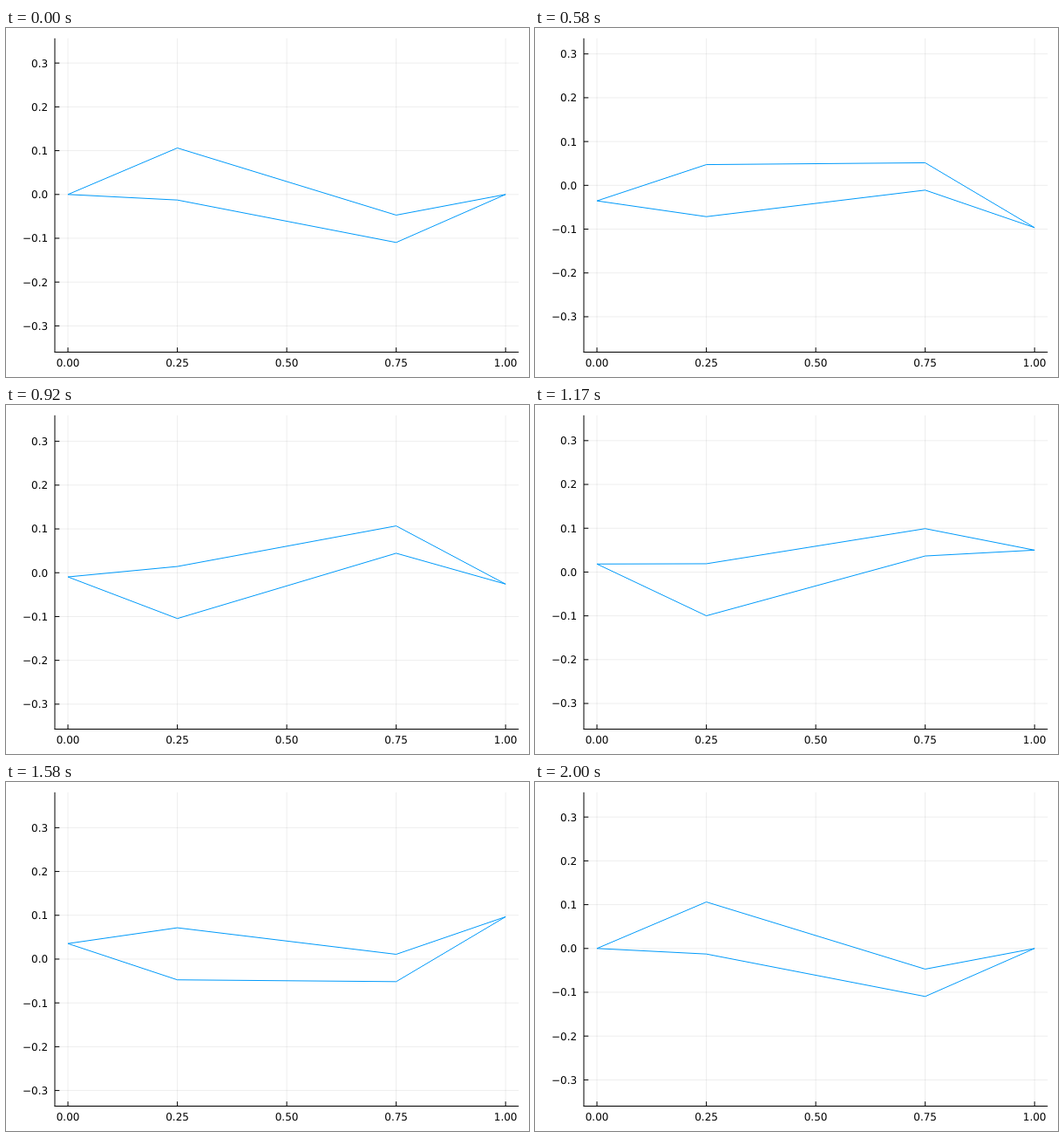
An HTML page for the animation above (2.08 s loop, 600x400 px).

```html
<!DOCTYPE html>
<html lang="en">
<head>
<meta charset="utf-8">
<title>Travelling wave</title>
<style>
  html, body { margin: 0; width: 100%; height: 100%; overflow: hidden; background: #fff; }
  svg { display: block; width: 600px; height: 400px; }
  text { font: 12px "DejaVu Sans", sans-serif; fill: #000; text-rendering: geometricPrecision; }
  path { fill: none; }
  #grid { stroke: #000; stroke-opacity: .1; stroke-width: .7; }
  #axes { stroke: #000; stroke-width: 1; }
  #body { stroke: #009afa; stroke-width: 1; stroke-linejoin: bevel; }
</style>
</head>
<body>
<svg viewBox="0 0 600 400">
  <path id="grid"/>
  <path id="axes"/>
  <g id="labels"></g>
  <path id="body"/>
</svg>
<script>
const LOOP = 2080, FPS = 12, STEPS = 24;
const TOP = 11.81, RIGHT = 588.19, BOTTOM = 371.5, TICK = 5.3;
const xTicks = [0, 0.25, 0.5, 0.75, 1];
const yTicks = [-3, -2, -1, 0, 1, 2, 3].map(n => n / 10);
const stations = [0, 0.25, 0.75, 1];

const byId = id => document.getElementById(id);
const grid = byId("grid"), axes = byId("axes"), body = byId("body");

function addLabel(text, anchor) {
  const label = document.createElementNS("http://www.w3.org/2000/svg", "text");
  label.textContent = text.replace("-", "\u2212");
  label.setAttribute("text-anchor", anchor);
  byId("labels").append(label);
  return label;
}
const xLabels = xTicks.map(v => addLabel(v.toFixed(2), "middle"));
const yLabels = yTicks.map(v => addLabel(v.toFixed(1), "end"));

function place(label, x, y) {
  label.setAttribute("x", x);
  label.setAttribute("y", y);
}

// 12% thick symmetric foil with a closed trailing edge
const thickness = x => 0.6 * (0.2969 * Math.sqrt(x) - 0.126 * x - 0.3516 * x ** 2
  + 0.2843 * x ** 3 - 0.1036 * x ** 4);
const amplitude = x => 0.0367 + 0.0323 * x + 0.031 * x * x;
const midline = (x, phase) => amplitude(x) * Math.sin(2 * Math.PI * x - phase);

function draw(step) {
  const phase = 2 * Math.PI * step / STEPS;
  const side = sign => stations.map(x => [x, midline(x, phase) + sign * thickness(x)]);
  const outline = [...side(1), ...side(-1).reverse()];
  const heights = outline.map(p => p[1]);
  const low = Math.min(...heights), high = Math.max(...heights);

  // The margin grows when steps of 0.05 give too few ticks
  const pad = 0.03 * (high - low);
  const count = Math.floor((high + pad) / 0.05) - Math.ceil((low - pad) / 0.05) + 1;
  const left = count < 4 ? 63.6 : 56;

  const unit = (RIGHT - left) / 1.06;
  const px = x => left + (x + 0.03) * unit;
  const py = y => (TOP + BOTTOM) / 2 - (y - (low + high) / 2) * unit;

  grid.setAttribute("d",
    xTicks.map(v => `M${px(v)} ${TOP}V${BOTTOM}`).join("") +
    yTicks.map(v => `M${left} ${py(v)}H${RIGHT}`).join(""));
  axes.setAttribute("d",
    `M${left} ${TOP}V${BOTTOM}M${left - 0.5} ${BOTTOM}H${RIGHT}` +
    xTicks.map(v => `M${px(v)} ${BOTTOM}v${-TICK}`).join("") +
    yTicks.map(v => `M${left} ${py(v)}h${TICK}`).join(""));
  body.setAttribute("d", "M" + outline.map(([x, y]) => `${px(x)} ${py(y)}`).join("L") + "Z");

  xTicks.forEach((v, i) => place(xLabels[i], px(v), 387.5));
  yTicks.forEach((v, i) => place(yLabels[i], left - 7.8, py(v) + 4.4));
}

let shown = -1;
function tick() {
  const ms = Math.floor(performance.now() % LOOP / 10) * 10;
  const step = Math.floor((ms + 5) * FPS / 1000);
  if (step !== shown) draw(shown = step);
  requestAnimationFrame(tick);
}
tick();
</script>
</body>
</html>
```
